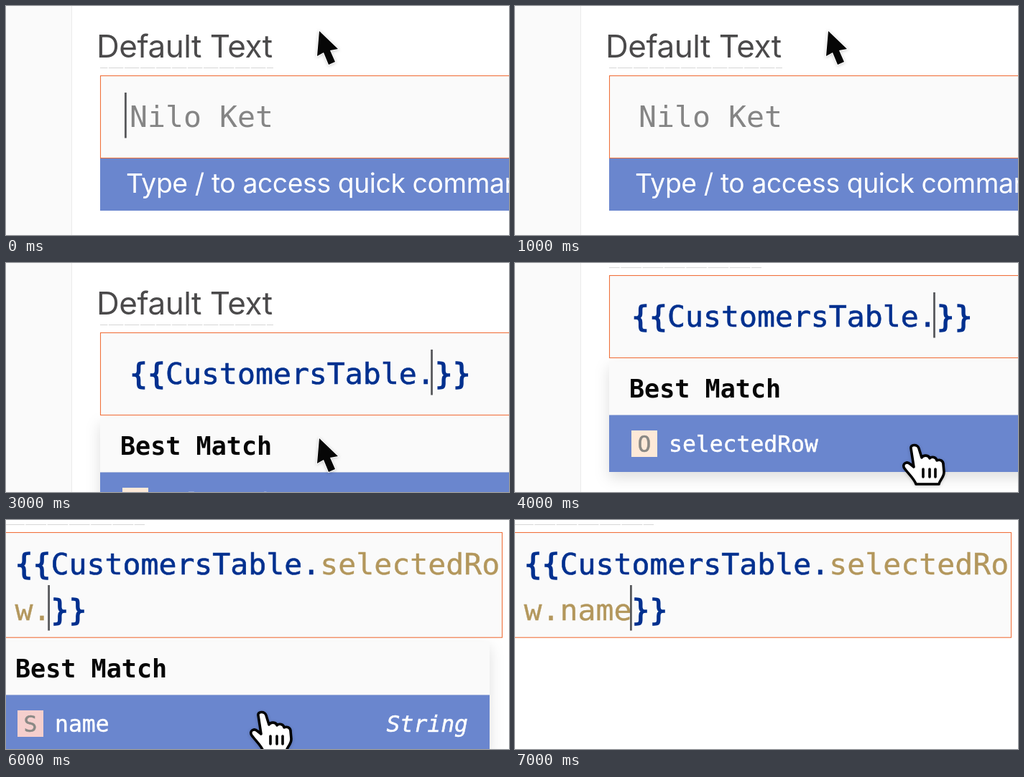
Write an HTML page that moves like this. It is 700 by 320 pixels and loops after 9000 ms.

```html
<!DOCTYPE html>
<html lang="en">
<head>
<meta charset="utf-8">
<title>Autocomplete in a text field</title>
<style>
  html, body { margin: 0; width: 100%; height: 100%; overflow: hidden; background: #fff; }
  svg { display: block; }
  text { white-space: pre; }
  .ui { font-family: Inter, sans-serif; }
  .code, .head, .item { font-family: "DejaVu Sans Mono", monospace; }
  .label { font-size: 44px; letter-spacing: -.5px; fill: #4b4a4b; }
  .tip { font-size: 37.3px; letter-spacing: -.4px; fill: #fff; }
  .code { font-size: 41.5px; }
  .blue { fill: #00308f; stroke: #00308f; stroke-width: .6px; }
  .brace { stroke-width: 1.6px; }
  .gold { fill: #b3975c; stroke: #b3975c; stroke-width: .4px; }
  .hint { fill: #858585; }
  .head { font-size: 35.1px; font-weight: 700; fill: #060606; }
  .item { font-size: 31.4px; fill: #fff; stroke: #fff; stroke-width: .5px; }
  .item.badge { fill: #8a8985; stroke: #8a8985; text-anchor: middle; }
  .item.type { font-style: italic; text-anchor: end; }
  .menu { filter: drop-shadow(0 8px 10px rgba(0, 0, 0, .13)); }
  .pointer { filter: drop-shadow(0 1px 2px rgba(0, 0, 0, .2)); }
</style>
</head>
<body>
<svg id="stage" width="700" height="320" viewBox="0 0 700 320"></svg>
<script>
const BLUE = '#6a86ce', PALE = '#fafafa';
const LOOP = 9000, STEP = 1000;

const rect = (x, y, w, h, fill, extra = '') =>
  `<rect x="${x}" y="${y}" width="${w}" height="${h}" fill="${fill}" ${extra}/>`;
const text = (x, y, cls, content) => `<text x="${x}" y="${y}" class="${cls}">${content}</text>`;
const span = (cls, content) => `<tspan class="${cls}">${content}</tspan>`;
const blue = s => span('blue', s.replace(/[{}]+/g, braces => span('brace', braces)));
const gold = s => span('gold', s);

const sidebar = rect(0, 0, 91, 320, PALE) + rect(91, 0, 1, 320, '#ebebeb');
const field = (x, y, w, h) => rect(x, y, w, h, PALE, 'stroke="#f0713c" stroke-width="1.1"');
const caret = (x, y) => rect(x - 1.4, y, 2.8, 63.5, '#58595c');
const dashes = (from, to, y, dash, offset) =>
  `<path d="M${from} ${y}H${to}" stroke="#d6d6d6" stroke-dasharray="${dash}" stroke-dashoffset="${offset}"/>`;
const label = text(126, 72, 'ui label', 'Default Text') + dashes(131, 372, 86.5, '20.4 1.6', 10);

const arrow = (x, y) => `<path class="pointer" transform="translate(${x} ${y})"
  d="M0 0L26 25L15 27L22 43L13 47L6 30L-3 35Z"
  fill="#060606" stroke="#fff" stroke-width="2" paint-order="stroke"/>`;

const hand = (x, y) => `<g class="pointer" transform="translate(${x} ${y})"
  fill="#fff" stroke="#000" stroke-width="3.6" stroke-linecap="round" stroke-linejoin="round">
  <path d="M-5 5C-6-1 4-1 6 5L10 18C12 14 20 14 21 19C24 16 30 17 31 22C35 20 40 22 40 27L41 38
    C41 46 35 49 34 55H2C0 48-9 40-14 33C-18 27-11 22-6 27L-1 31Z"/>
  <path d="M12 34V45M21 34V45M29 34V45"/></g>`;

// The menu is anchored at the top left of its highlighted row.
const menu = (x, y, w, badge, badgeFill, name, type = '') =>
  `<g class="menu">${rect(x, y - 75, w, 75, PALE)}${rect(x, y, w, 79.5, BLUE)}</g>` +
  text(x + 28, y - 25, 'head', 'Best Match') +
  rect(x + 31, y + 21.5, 36, 37, badgeFill) +
  text(x + 49, y + 51.5, 'item badge', badge) +
  text(x + 83, y + 51.5, 'item', name) +
  text(x + w - 30, y + 51.5, 'item type', type);

const emptyField = caretShown =>
  sidebar + label + field(131.5, 97.5, 600, 115) +
  text(172, 169, 'code hint', 'Nilo Ket') +
  (caretShown ? caret(166.4, 121) : '') +
  rect(131, 213, 569, 73, BLUE) +
  text(167, 261, 'ui tip', 'Type / to access quick commands') +
  arrow(436, 35);

const objectMenu = y => menu(131, y, 600, 'O', '#fde9d8', 'selectedRow');

const wideField = (tail, caretX) =>
  dashes(0, 193, 6.5, '28.7 1.6', 3) + field(-20, 17.5, 710.5, 146.7) +
  text(12.5, 75.5, 'code', blue('{{CustomersTable.') + gold('selectedRo')) +
  text(12.5, 139.5, 'code', gold(tail) + blue('}}')) +
  caret(caretX, 91);

const nameMenu = menu(-15, 244.5, 688, 'S', '#f5cfcd', 'name', 'String');

const scenes = [
  emptyField(true),
  emptyField(false),
  sidebar + label + field(131.5, 97.5, 600, 115) +
    text(172, 169, 'code', blue('{{}}')) + caret(221.5, 121) + arrow(436, 35),
  sidebar + label + objectMenu(292.5) + field(131.5, 97.5, 600, 115) +
    text(172, 169, 'code', blue('{{CustomersTable.}}')) + caret(592.5, 121) + arrow(436, 245),
  sidebar + dashes(131, 343, 6.5, '28.7 1.6', 14) + objectMenu(212.5) + field(131.5, 17.5, 600, 115) +
    text(162, 89, 'code', blue('{{CustomersTable.}}')) + caret(583.5, 41) + hand(556, 254),
  nameMenu + wideField('w.', 59.6) + arrow(305, 191),
  nameMenu + wideField('w.', 59.6) + hand(356, 268),
  wideField('w.name', 161.4)
];

const stage = document.getElementById('stage');
const start = performance.now();
let shown = -1;

function draw() {
  const time = (performance.now() - start) % LOOP;
  const index = Math.min(Math.floor(time / STEP), scenes.length - 1);
  if (index !== shown) {
    stage.innerHTML = scenes[index];
    shown = index;
  }
  requestAnimationFrame(draw);
}
draw();
</script>
</body>
</html>
```
